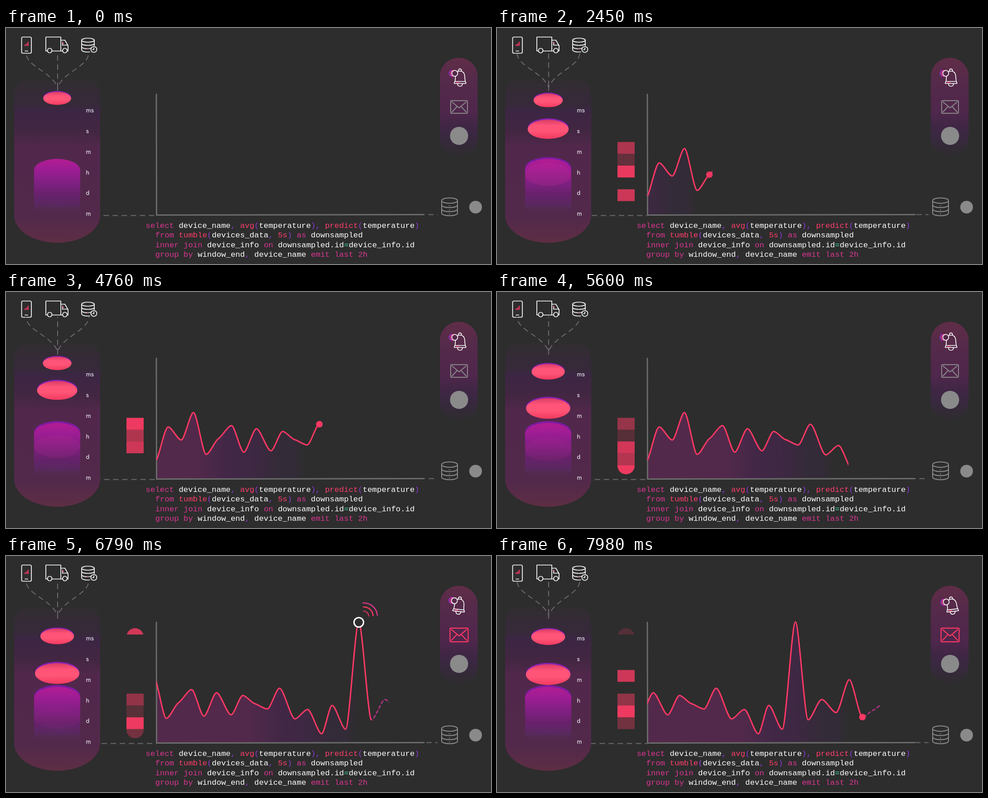
An HTML page that plays this animation: 1071 by 523 pixels, repeating every 8 s.

```html
<!DOCTYPE html>
<html lang="en">
<head>
<meta charset="utf-8">
<title>Streaming pipeline</title>
<style>
html, body { margin: 0; width: 100%; height: 100%; overflow: hidden; background: #2d2d2d; }
svg { display: block; width: 1071px; height: 523px; }
.line { fill: none; stroke-linecap: round; stroke-linejoin: round; }
.white { stroke: #fff; stroke-width: 1.7; }
.grey { stroke: #8a8a8a; stroke-width: 2; }
.red { stroke: #ff3864; }
.flow { stroke: #6b6b6b; stroke-width: 2; stroke-dasharray: 12 8; fill: none; }
.units { font: 12.5px Inter, "Open Sans", sans-serif; fill: #fff; }
.code { font: 17.36px "Liberation Mono", monospace; fill: #fff; white-space: pre; }
.k { fill: #dc3594; }
.f { fill: #ff3d6b; }
.p { fill: #8f38d8; }
.o { fill: #3fd6b0; }
</style>
</head>
<body>
<svg viewBox="0 0 1071 523">
  <defs>
    <linearGradient id="tank" gradientUnits="userSpaceOnUse" x1="0" y1="105" x2="0" y2="476">
      <stop offset="0" stop-color="#2d2d2d"/><stop offset=".06" stop-color="#332c34"/>
      <stop offset=".18" stop-color="#37293a"/><stop offset=".21" stop-color="#3c2644"/>
      <stop offset=".33" stop-color="#422642"/><stop offset=".43" stop-color="#51284b"/>
      <stop offset=".84" stop-color="#52294b"/><stop offset="1" stop-color="#5e2d44"/>
    </linearGradient>
    <linearGradient id="panel" x1="0" y1="0" x2="0" y2="1">
      <stop offset="0" stop-color="#602d47"/><stop offset=".22" stop-color="#552a4a"/>
      <stop offset=".55" stop-color="#4f274c"/><stop offset=".7" stop-color="#3f2645"/>
      <stop offset=".84" stop-color="#36293c"/><stop offset="1" stop-color="#2d2d2d"/>
    </linearGradient>
    <linearGradient id="store" gradientUnits="userSpaceOnUse" x1="0" y1="290" x2="0" y2="414">
      <stop offset="0" stop-color="#b31c93"/><stop offset=".2" stop-color="#9c1d94"/>
      <stop offset=".45" stop-color="#7d2080"/><stop offset=".65" stop-color="#66216a"/>
      <stop offset=".82" stop-color="#5c2868" stop-opacity=".75"/>
      <stop offset="1" stop-color="#52294b" stop-opacity="0"/>
    </linearGradient>
    <linearGradient id="coral" x1="0" y1="0" x2="0" y2="1">
      <stop offset="0" stop-color="#d83c66"/><stop offset=".3" stop-color="#ff5378"/>
      <stop offset=".6" stop-color="#ff5577"/><stop offset="1" stop-color="#f23a60"/>
    </linearGradient>
    <linearGradient id="shade" gradientUnits="userSpaceOnUse" x1="-270" y1="0" x2="0" y2="0">
      <stop offset="0" stop-color="#52294a"/><stop offset=".25" stop-color="#422747"/>
      <stop offset=".48" stop-color="#3d2842"/><stop offset=".66" stop-color="#342b38"/>
      <stop offset=".8" stop-color="#332b37"/><stop offset=".93" stop-color="#2d2d2d" stop-opacity="0"/>
    </linearGradient>
    <clipPath id="past"><rect id="pastBox" x="332" y="130" height="284"/></clipPath>
    <clipPath id="future"><rect id="futureBox" y="130" height="284"/></clipPath>
    <clipPath id="bar"><rect x="266" y="160" width="38" height="244" rx="19"/></clipPath>
    <g id="disc">
      <ellipse cy="-1.5" rx="50" ry="23.5" fill="#8a20b4"/>
      <ellipse cy="1.5" rx="50" ry="23.5" fill="url(#coral)"/>
    </g>
  </defs>

  <!-- data sources -->
  <g class="line white">
    <rect x="34.500" y="20" width="21.500" height="36" rx="3"/><path d="M42 51H48"/>
    <path d="M91 51H88V20H121V51H101M121 27H130L137 39V51H135M125 51H121M125 31V38H136"/>
    <circle cx="96.500" cy="50" r="5"/><circle cx="130" cy="50" r="5"/>
    <ellipse cx="181" cy="27" rx="14" ry="4.500"/>
    <path d="M167 27V48C167 52 175 54 185 53M195 27V39M167 34C167 40 195 40 195 34M167 41C167 46 180 47 187 45"/>
    <circle cx="194" cy="47.500" r="6.500"/><path d="M194 44V48H191"/>
    <path class="red" d="M41.500 39V37.500M44 39V36M46.500 39V34M49 39V31M125 32L127 34M180.500 45.500H181"/>
  </g>
  <path fill="url(#tank)" d="M18 158Q18 105 66 105H160Q208 105 208 158V415A95 61 0 0 1 18 415Z"/>
  <g class="flow" id="inflow">
    <path d="M44 55C46 86 98 95 114 131V139"/>
    <path d="M114 55V139"/>
    <path d="M183 55C181 86 130 95 114 131V139"/>
  </g>
  <g id="discs"></g>
  <ellipse id="rim" cx="113" cy="311" rx="51" ry="25" fill="#7d1ba3"/>
  <path fill="url(#store)" d="M62 315A51 25 0 0 1 164 315V414H62Z"/>
  <ellipse id="sinking" cx="113" rx="51" ry="25.500" fill="#d03090"/>
  <g class="units">
    <text x="176.500" y="187">ms</text><text x="176.500" y="233">s</text><text x="176.500" y="279">m</text>
    <text x="176.500" y="325">h</text><text x="176.500" y="369.500">d</text><text x="176.500" y="416">m</text>
  </g>

  <!-- chart -->
  <g id="cells" clip-path="url(#bar)" fill="#ee3a60"></g>
  <g clip-path="url(#past)"><path id="area" fill="url(#shade)"/></g>
  <g class="flow" id="outflow">
    <path d="M208 415.500H332"/><path d="M925 413.500H953"/>
  </g>
  <path class="line" stroke="#6b6b6b" stroke-width="3" d="M332 147L332.500 414.500L923 413.500"/>
  <g clip-path="url(#future)">
    <path id="forecast" class="line" stroke="#a8327f" stroke-width="3" stroke-dasharray="6 6"/>
  </g>
  <g clip-path="url(#past)"><path id="curve" class="line red" stroke-width="3"/></g>
  <circle id="dot" r="7.300" fill="#ff3864"/>
  <g id="alarm">
    <circle r="10.500" fill="#2d2d2d" stroke="#fff" stroke-width="3"/>
    <g id="waves" class="line" stroke-width="2.600">
      <path stroke="#d8335f" d="M10.500-25A11.500 11.500 0 0 1 22-14"/>
      <path stroke="#ff3864" d="M10.500-34A20 20 0 0 1 31.500-15"/>
      <path stroke="#dc3588" d="M9.500-43A30 30 0 0 1 41-16"/>
    </g>
  </g>

  <!-- outputs -->
  <rect x="958" y="66" width="83.500" height="220" rx="41.500" fill="url(#panel)"/>
  <g id="bell" class="line white">
    <path d="M990 123V121C993 118 992 112 992.500 106C993 99 997 95.500 1002.500 95.500S1012 99 1013 106C1013.500 112 1013 118 1015.500 121V123ZM991 118.500H1014M999 95.500C999 89 1006 89 1006 95.500M997 124C998 131 1007 131 1008 124"/>
    <path class="red" d="M994 120.500H1001"/>
    <circle cx="985" cy="100.500" r="6.500" stroke="#8a30d8"/>
    <circle cx="988" cy="100.500" r="6.500" stroke="#ff3890"/>
    <circle cx="991" cy="100.500" r="6.500" fill="#552a4a"/>
  </g>
  <g id="mail" class="line grey">
    <rect x="982" y="161" width="37" height="28" rx="2"/>
    <path d="M985 164L1000.500 177L1016 164M985 186L996 174M1016 186L1005 174"/>
  </g>
  <circle cx="1000.500" cy="239" r="20" fill="#8a8a8a"/>
  <g class="line grey">
    <ellipse cx="979.500" cy="382.500" rx="17.500" ry="6"/>
    <path d="M962 382.500V410C962 418 997 418 997 410V382.500M962 392C962 400 997 400 997 392M962 401C962 409 997 409 997 401M979 394H979.500M979 403.500H979.500M979 412H979.500"/>
  </g>
  <circle cx="1037" cy="397" r="14" fill="#8a8a8a"/>

  <g class="code">
    <text x="308.500" y="442.500"><tspan class="k">select</tspan> device_name<tspan class="p">,</tspan> <tspan class="f">avg</tspan><tspan class="p">(</tspan>temperature<tspan class="p">),</tspan> <tspan class="f">predict</tspan><tspan class="p">(</tspan>temperature<tspan class="p">)</tspan></text>
    <text x="329.500" y="464"><tspan class="k">from</tspan> <tspan class="f">tumble</tspan><tspan class="p">(</tspan>devices_data<tspan class="p">,</tspan> <tspan class="f">5s</tspan><tspan class="p">)</tspan> <tspan class="k">as</tspan> downsampled</text>
    <text x="329.500" y="485.500"><tspan class="k">inner join</tspan> device_info <tspan class="k">on</tspan> downsampled.id<tspan class="o">=</tspan>device_info.id</text>
    <text x="329.500" y="507"><tspan class="k">group by</tspan> window_end<tspan class="p">,</tspan> device_name <tspan class="k">emit last 2h</tspan></text>
  </g>
</svg>
<script>
const LOOP = 8000, STEP = 70;
const POINT_START = 954, POINT_TIME = 292.7;
const DISC_TIME = 588, DISC_LIFE = 1240;
const PEAK = 19, HEAD_STOP = 807;

const points = [
  [333, 371], [358, 299], [387, 328], [414, 267], [442, 360], [469, 325], [498, 296],
  [525, 355], [553, 303], [585, 352], [611, 309], [637, 327], [665, 339], [692, 293],
  [726, 361], [754, 340], [785, 394], [808, 331], [838, 384], [867, 146], [895, 363],
  [925, 318], [957, 347], [986, 274], [1015, 357], [1038, 342], [1062, 324]
];
// Heat bar row lit by each point, 0 being the top cap
const rows = [...'8564865767667587968086747'].map(Number);
const headKeys = [[954, 333], [1400, 376], [3500, 575], [4760, 692], [5600, 776], [6790, 895], [7980, 1015]];

const $ = id => document.getElementById(id);
const clamp = v => Math.max(0, Math.min(1, v));
const set = (el, attrs) => { for (const name in attrs) el.setAttribute(name, attrs[name]); };
const add = (parent, tag, attrs) => {
  const el = document.createElementNS('http://www.w3.org/2000/svg', tag);
  set(el, attrs);
  return parent.appendChild(el);
};

function smoothPath(pts) {
  const slope = i => (pts[i + 1][1] - pts[i][1]) / (pts[i + 1][0] - pts[i][0]);
  const tangent = pts.map((_, i) => {
    if (i === 0) return slope(0) * 0.8;
    if (i === pts.length - 1) return slope(i - 1);
    const a = slope(i - 1), b = slope(i);
    return a * b <= 0 ? 0 : a * b / (a + b);
  });
  let d = 'M' + pts[0];
  for (let i = 1; i < pts.length; i++) {
    const [x0, y0] = pts[i - 1], [x1, y1] = pts[i], h = (x1 - x0) * 0.28;
    d += `C${x0 + h} ${y0 + tangent[i - 1] * h} ${x1 - h} ${y1 - tangent[i] * h} ${x1} ${y1}`;
  }
  return d;
}

const curvePath = smoothPath(points);
set($('curve'), { d: curvePath });
set($('forecast'), { d: curvePath });
set($('area'), { d: curvePath + 'V414H333Z' });

const cells = Array.from({ length: 10 }, (_, i) =>
  add($('cells'), 'rect', i ? { x: 266, y: 174 + 26.2 * (i - 1), width: 38, height: 26.2 }
                            : { x: 266, y: 160, width: 38, height: 14 }));
const discs = [0, 1, 2].map(() => add($('discs'), 'use', { href: '#disc' }));

function headAt(t) {
  if (t <= headKeys[0][0]) return headKeys[0][1];
  const i = Math.max(1, headKeys.findIndex(key => t <= key[0]));
  const [t0, x0] = headKeys[i - 1], [t1, x1] = headKeys[i];
  return x0 + (x1 - x0) * (t - t0) / (t1 - t0);
}

function drawTank(t) {
  set($('inflow'), { 'stroke-dashoffset': -(11 + 0.0472 * (t - 3500)) });
  set($('outflow'), { 'stroke-dashoffset': -(10 + 0.0465 * (t - 3500)) });
  const newest = Math.floor(t / DISC_TIME);
  discs.forEach((disc, i) => {
    const age = t - (newest - i) * DISC_TIME;
    const drop = 1 + 0.035 * age + 1.13e-4 * age ** 2 - 2.85e-8 * age ** 3;
    const scale = (54.5 - 24 * Math.exp(-drop / 72)) / 50;
    set(disc, {
      transform: `translate(113 ${154 + drop}) scale(${scale})`,
      opacity: newest < i ? 0 : clamp((DISC_LIFE - age) / 130)
    });
  });
  set($('rim'), { opacity: clamp((t - 1150) / 130) });
  set($('sinking'), {
    cy: 316 + Math.max(0, t - 1400) * 0.0078,
    opacity: 0.28 * clamp((t - 1150) / 130) * clamp(1 - t / 8600)
  });
}

function drawChart(t) {
  const head = headAt(t), scroll = Math.max(0, head - HEAD_STOP), edge = head - scroll;
  const shift = `translate(${-scroll} 0)`;
  const index = (t - POINT_START) / POINT_TIME;

  for (const id of ['curve', 'area', 'forecast']) set($(id), { transform: shift });
  set($('shade'), { gradientTransform: `translate(${head} 0)` });
  set($('pastBox'), { width: index < 0 ? 0 : edge - 332 });
  set($('futureBox'), { x: edge - 6, width: 45 * clamp((t - 5930) / 400) });

  const last = Math.floor(index), fade = index - last;
  const shown = last >= 0 && last !== PEAK;
  const [x, y] = points[Math.max(0, last)];
  set($('dot'), { cx: x - scroll, cy: y, opacity: shown ? clamp(1 - fade / 0.85) : 0 });

  const light = cells.map(() => 0);
  rows.forEach((row, i) => {
    const age = index - i + (i < 3 ? 0.5 : 0.15);
    if (age >= 0) light[row] = clamp(1 - 0.16 * (age - 0.15));
  });
  cells.forEach((cell, i) => set(cell, { opacity: light[i] }));

  const since = t - POINT_START - PEAK * POINT_TIME;
  drawAlarm(since, points[PEAK][0] - scroll);
}

function drawAlarm(since, x) {
  const on = since >= 0;
  set($('alarm'), {
    transform: `translate(${x} 147)`,
    opacity: on ? clamp((1000 - since) / 150) : 0
  });
  [...$('waves').children].forEach((wave, i) =>
    set(wave, { opacity: clamp((since - i * 70) / 70) * (i ? 1 : 0.85) }));
  const swing = on ? 8 * Math.sin(since * Math.PI / 400) : 0;
  set($('bell'), { transform: `rotate(${swing} 1002.5 93)` });
  const grow = 1 + 0.08 * clamp(since / 250);
  set($('mail'), {
    class: 'line grey' + (on ? ' red' : ''),
    transform: `translate(1000.5 175) scale(${grow}) translate(-1000.5 -175)`
  });
}

const start = performance.now();
function frame() {
  const t = Math.floor((performance.now() - start) % LOOP / STEP) * STEP;
  drawTank(t);
  drawChart(t);
  requestAnimationFrame(frame);
}
frame();
</script>
</body>
</html>
```
